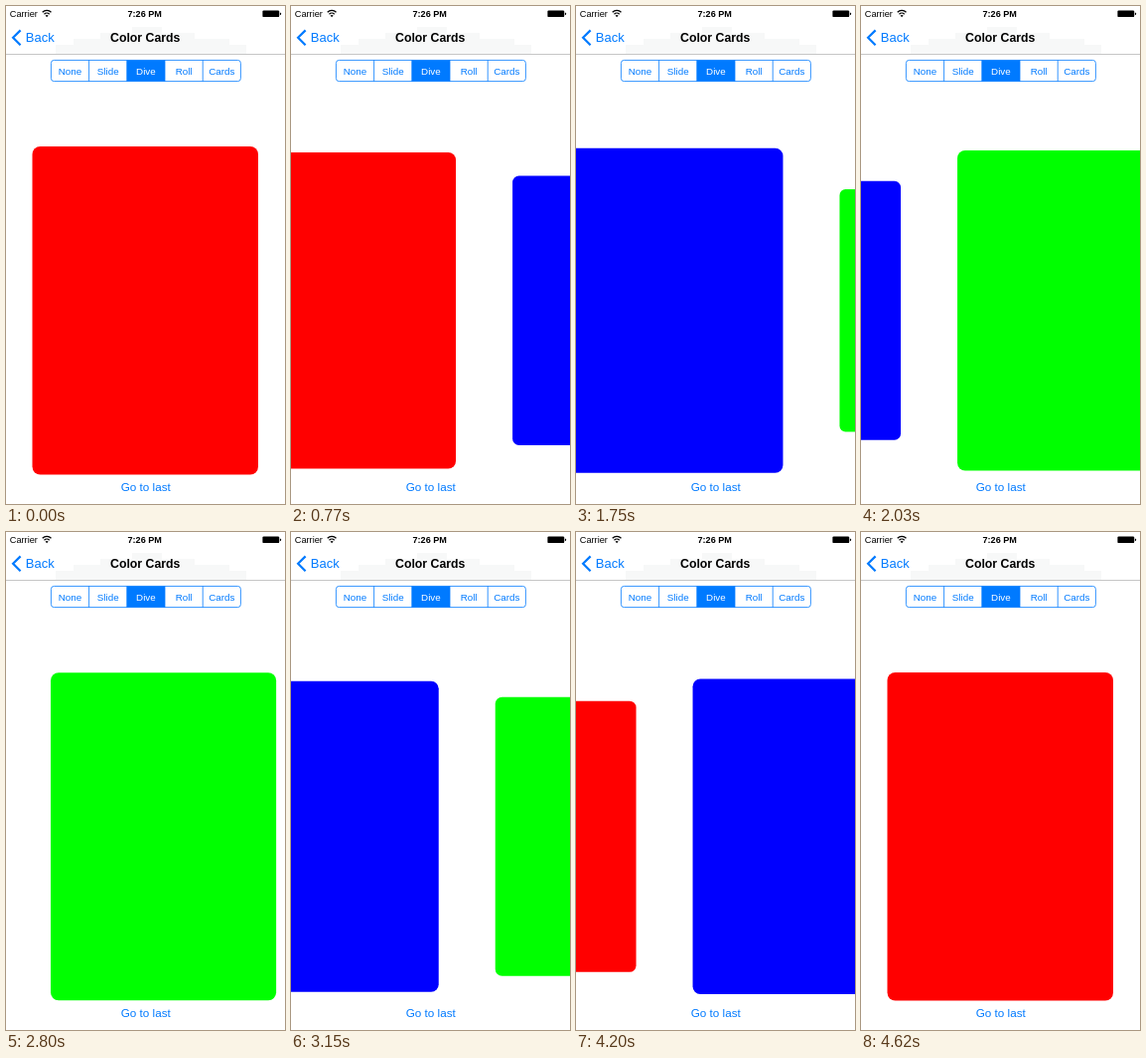
An HTML page for the animation above (5.95 s loop, 281 px wide and 500 px high).

```html
<!DOCTYPE html>
<html lang="en">
<head>
<meta charset="utf-8">
<title>Color Cards</title>
<style>
  html, body { margin: 0; width: 100%; height: 100%; overflow: hidden; background: #fff; }
  svg { display: block; width: 100%; height: 100%; }
  text { font-family: "Liberation Sans", Arial, sans-serif; }
  .middle { text-anchor: middle; }
  .bold { font-weight: bold; }
  .tint { fill: #007aff; }
  .line { fill: none; stroke: #007aff; }
</style>
</head>
<body>
<svg viewBox="0 0 281 500">
  <rect width="281" height="500" fill="#fff"/>
  <path d="M127 21h30v6h33v6h35v6h17v9H50v-9h18v-6h27v-6h32z" fill="#f7f8f8"/>
  <rect y="48" width="281" height="0.8" fill="#b8b8b8"/>

  <text x="3.8" y="11" font-size="9.2">Carrier</text>
  <g fill="none" stroke="#000" stroke-width="1.3">
    <path d="M36.7 6.3a6.2 6.2 0 0 1 8.8 0M38.5 8.2a3.7 3.7 0 0 1 5.2 0"/>
  </g>
  <path d="M41.1 11.2l-1.5-1.6a2.2 2.2 0 0 1 3 0z"/>
  <text class="middle bold" x="139.7" y="11" font-size="9.1">7:26 PM</text>
  <rect x="258.4" y="4.4" width="16.8" height="6.7" rx="1.2" fill="#000"/>
  <path d="M275.9 6.4q1.3 .2 1.3 1.4t-1.3 1.4z"/>

  <path class="line" d="M14.6 24.4L7.1 31.8l7.5 7.4" stroke-width="2.2"/>
  <text class="tint" x="19.8" y="36.2" font-size="13">Back</text>
  <text class="middle bold" x="140.2" y="36.2" font-size="12.3">Color Cards</text>

  <g id="tabs"></g>
  <g id="cards"></g>
  <text class="tint middle" x="140.8" y="487.4" font-size="11.7">Go to last</text>
</svg>
<script>
  const LOOP = 5950, STEP = 70;
  const CARD = { left: 26.5, top: 141, width: 227.5, height: 329.5, radius: 8 };
  const SPACING = 284.5, TILT = 0.88;

  // Each swipe: start time, pages from and to, progress for every step.
  const SWIPES = [
    { at: 770, from: 0, to: 1,
      steps: [.309, .47, .55, .55, .7, .85, .95, .99, 1] },
    { at: 1680, from: 1, to: 2,
      steps: [.065, .16, .29, .44, .6, .752, .87, .95, .985, 1] },
    { at: 2800, from: 2, to: 1,
      steps: [.065, .16, .28, .4, .52, .63, .74, .84, .925, .985, 1] },
    { at: 4060, from: 1, to: 0,
      steps: [.065, .17, .32, .48, .64, .78, .89, .97, 1] }
  ];

  function add(parent, name, attrs, text = "") {
    const node = document.createElementNS("http://www.w3.org/2000/svg", name);
    for (const key in attrs) node.setAttribute(key, attrs[key]);
    node.textContent = text;
    return parent.appendChild(node);
  }

  const tabs = document.getElementById("tabs");
  const TAB = 38.2, TABS_LEFT = 45.4, TABS_TOP = 54.4, TAB_HEIGHT = 21.2;
  add(tabs, "rect", { class: "line", x: TABS_LEFT, y: TABS_TOP, width: TAB * 5,
    height: TAB_HEIGHT, rx: 3, "stroke-width": 0.8 });
  ["None", "Slide", "Dive", "Roll", "Cards"].forEach((label, i) => {
    const x = TABS_LEFT + i * TAB, active = label === "Dive";
    if (i) add(tabs, "path", { class: "line", d: `M${x} ${TABS_TOP}v${TAB_HEIGHT}`, "stroke-width": 0.8 });
    if (active) add(tabs, "rect", { class: "tint", x, y: TABS_TOP, width: TAB, height: TAB_HEIGHT });
    add(tabs, "text", { class: "middle", x: x + TAB / 2, y: 68.5, "font-size": 9.8,
      fill: active ? "#fff" : "#007aff" }, label);
  });

  const cards = ["#f00", "#00f", "#0f0"].map(fill =>
    add(document.getElementById("cards"), "rect", {
      fill, width: CARD.width, height: CARD.height, rx: CARD.radius
    }));

  function pageAt(time) {
    let page = 0;
    for (const { at, from, to, steps } of SWIPES) {
      if (time < at) break;
      const index = Math.min(Math.floor((time - at) / STEP), steps.length - 1);
      page = from + (to - from) * steps[index];
    }
    return page;
  }

  // Cards shrink away from the centre while their inner edge follows the scroll.
  function draw(page) {
    cards.forEach((card, i) => {
      const offset = i - page;
      const scale = Math.cos(TILT * Math.min(Math.abs(offset), 1));
      const shrink = offset < 0 ? CARD.width * (1 - scale) : 0;
      const x = CARD.left + offset * SPACING + shrink;
      const y = CARD.top + CARD.height * (1 - scale) / 2;
      card.setAttribute("transform", `translate(${x} ${y}) scale(${scale})`);
    });
  }

  const start = performance.now();
  function tick() {
    draw(pageAt((performance.now() - start) % LOOP));
    requestAnimationFrame(tick);
  }
  tick();
</script>
</body>
</html>
```
